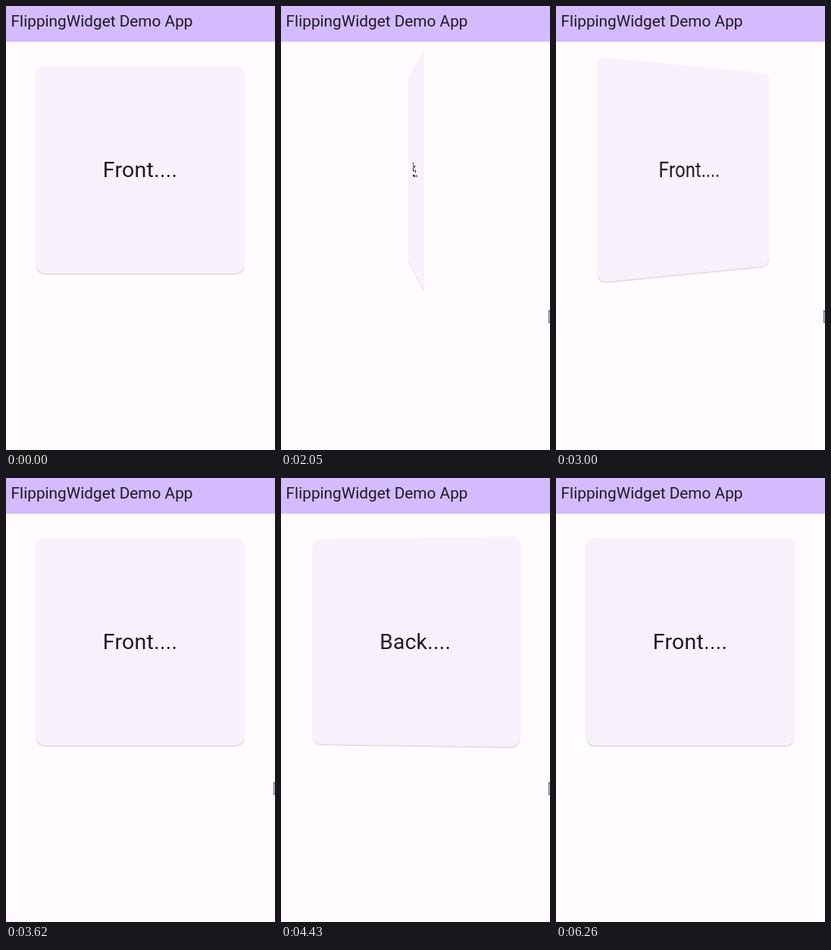
An HTML page for the animation above (6.43 s loop, 355 px wide and 584 px high).

```html
<!DOCTYPE html>
<html lang="en">
<head>
<meta charset="utf-8">
<title>Flipping card</title>
<style>
  html, body {
    margin: 0;
    width: 100%;
    height: 100%;
    overflow: hidden;
    background: #fffbff;
    font-family: Roboto, sans-serif;
    color: #1d1a22;
  }
  #stage {
    position: relative;
    width: 355px;
    height: 584px;
    overflow: hidden;
  }
  #bar {
    position: absolute;
    left: 0;
    top: 0;
    width: 355px;
    height: 47px;
    background: #d4bbfd;
  }
  #title {
    position: absolute;
    left: 6.6px;
    top: 0;
    font-size: 20.8px;
    line-height: 40px;
    white-space: nowrap;
  }
  #card {
    position: absolute;
    left: 39.5px;
    top: 79px;
    width: 274px;
    height: 273px;
    border-radius: 11px;
    background: #f7f1fb;
    box-shadow: 0 1px 1.5px rgba(0, 0, 0, .2), 0 0 1px rgba(0, 0, 0, .08);
    font-size: 28.5px;
    line-height: 274px;
    letter-spacing: .24px;
    text-align: center;
    white-space: nowrap;
  }
  #pointer {
    position: absolute;
    left: 0;
    top: 0;
    width: 14px;
    height: 20px;
    overflow: visible;
  }
</style>
</head>
<body>
<div id="stage">
  <div id="bar"><div id="title">FlippingWidget Demo App</div></div>
  <div id="card">Front....</div>
  <svg id="pointer" viewBox="0 0 14 20">
    <path d="M.5 1V18L4.5 14H11Z" fill="#d8cbe6" stroke="#6a6078"/>
  </svg>
</div>
<script>
const LOOP = 6430;
const TURN = 632;
const RETURN = 1200;
const DEPTH = 980;

const card = document.getElementById('card');
const pointer = document.getElementById('pointer');
const clamp = x => Math.min(1, Math.max(0, x));
const progress = (t, start, length) => clamp((t - start) / length);
const mix = (a, b, p) => a + (b - a) * p;

function elasticInOut(p) {
  if (p === 0 || p === 1) return p;
  const x = 2 * p - 1;
  const wave = Math.sin((x - 0.1) * 5 * Math.PI) / 2;
  return x < 0 ? -wave * 2 ** (10 * x) : 1 + wave * 2 ** (-10 * x);
}

// Each cycle turns over evenly, then springs back.
const cycles = [[1720, 2365], [3819, 4464]];

function cardAngle(t) {
  let angle = 0;
  for (const [out, back] of cycles) {
    angle += 180 * (progress(t, out, TURN) - elasticInOut(progress(t, back, RETURN)));
  }
  return angle;
}

function drawCard(t) {
  const angle = cardAngle(t);
  const isBack = Math.cos(angle * Math.PI / 180) < 0;
  const label = isBack ? 'Back....' : 'Front....';
  if (card.textContent !== label) card.textContent = label;
  card.style.transform = `perspective(${DEPTH}px) rotateY(${isBack ? angle - 180 : angle}deg)`;
}

function drawPointer(t) {
  const visible = t >= 670 && t < 5700;
  pointer.style.visibility = visible ? 'visible' : 'hidden';
  const enter = progress(t, 670, 190);
  const leave = progress(t, 5640, 60);
  const x = mix(349, 353, enter) - 10 * Math.sin(Math.PI * enter) + 2 * leave;
  const y = mix(534, 399, enter) + 5 * leave;
  pointer.style.transform = `translate(${x}px, ${y}px)`;
}

const began = performance.now();

function frame() {
  const t = (performance.now() - began) % LOOP;
  drawCard(t);
  drawPointer(t);
  requestAnimationFrame(frame);
}
frame();
</script>
</body>
</html>
```
